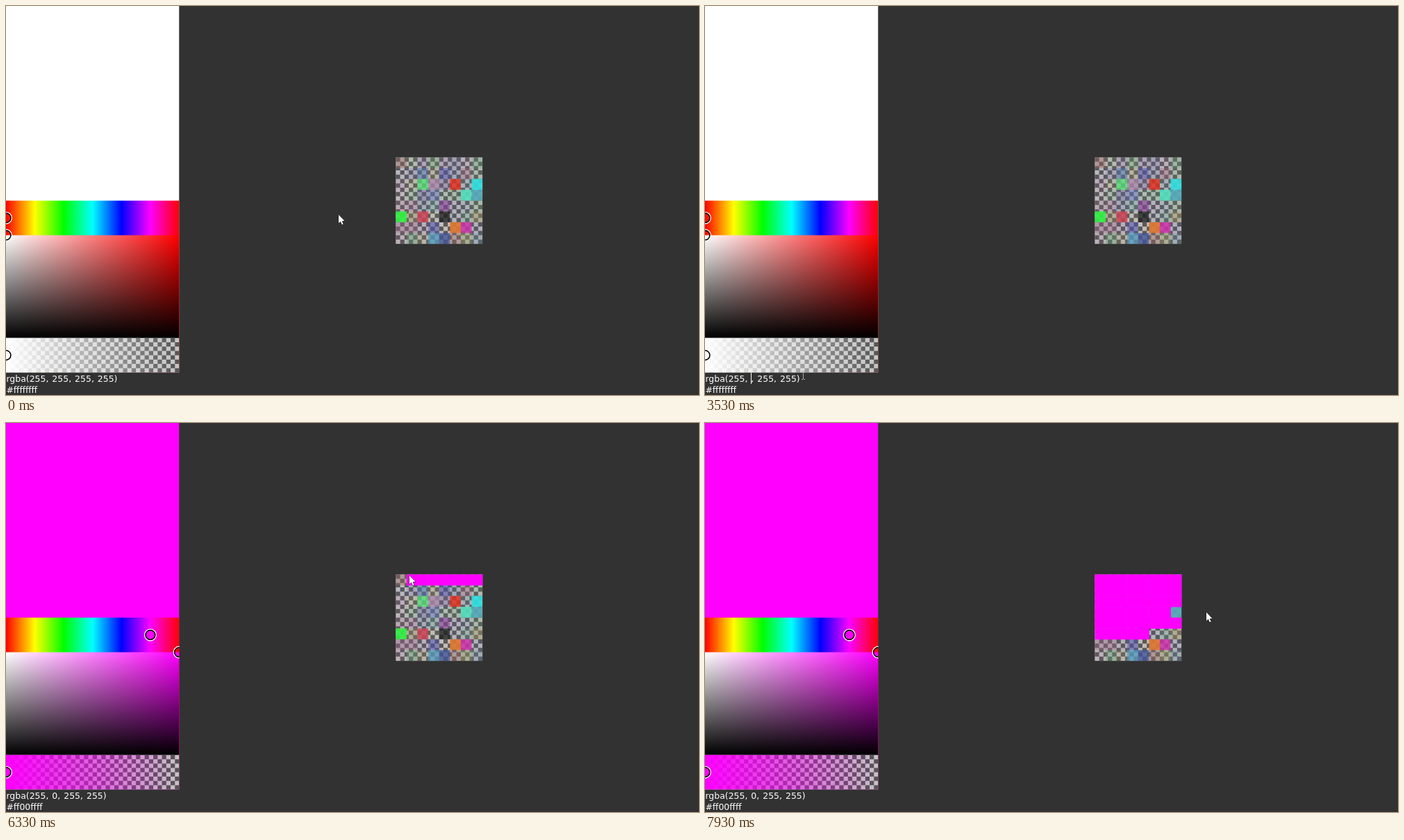
An HTML page with a canvas for the animation above (8000 ms loop, 998 by 561 pixels).

```html
<!DOCTYPE html>
<html>
<head>
<meta charset="utf-8">
<style>
  html, body { margin: 0; height: 100%; overflow: hidden; background: #323232; }
  canvas { display: block; }
</style>
</head>
<body>
<canvas id="stage" width="998" height="561"></canvas>
<script>
const ctx = document.getElementById('stage').getContext('2d');
const LOOP = 8000, STEP = 200 / 3;

// Layout of a 1280 pixel wide window, scaled to the stage
const S = 998 / 1280;
const PANEL = 320 * S, HUE_Y = 360 * S, SV_Y = 424 * S, ALPHA_Y = 614 * S, TEXT_Y = 678 * S;
const CHECK = 8 * S, PIXEL = 20 * S, SPRITE_X = 720 * S, SPRITE_Y = 280 * S;

const ENTER = 4670;
const BRUSH_START = 6150, ROW_TIME = 295, LAST_ROW = 5.575;
const SKIPPED = '3,7';

// Strong sprite pixels by row and column; the rest are faint random tints
const accents = {
  '1,2': '#57a9', '1,4': '#55a9', '2,2': '#5d7c', '2,3': '#a8ac', '2,5': '#d32d', '2,7': '#3dde',
  '3,3': '#67b8', '3,6': '#5dbe', '3,7': '#5abe', '4,4': '#849a', '5,0': '#3e4e', '5,2': '#c45d',
  '5,4': '#222c', '6,3': '#55a9', '6,5': '#d73e', '6,6': '#c3ad', '7,3': '#59bc', '7,4': '#459c'
};

// Pointer path before painting: time, x, y
const path = [
  [0, 479, 301], [800, 140, 508], [1000, 187, 506], [1400, 118, 536], [2050, 160, 537],
  [2600, 93, 537], [2870, 141, 532], [5400, 141, 532], [5870, 651, 169], [BRUSH_START, 708, 220]
];

let seed = 7;
const random = () => (seed = seed * 16807 % 2147483647) / 2147483647;
const cells = Array.from({ length: 64 }, (_, i) => {
  const row = i >> 3, col = i & 7;
  const tint = `hsla(${random() * 360}, 20%, 50%, ${0.1 + 0.4 * random()})`;
  return { row, col, key: row + ',' + col, fill: accents[row + ',' + col] || tint };
});

const mix = (a, b, k) => a + (b - a) * k;

// Rows swept so far, as a fraction
const sweepAt = t => Math.min((t - BRUSH_START) / ROW_TIME, LAST_ROW);
const brushX = sweep => 618 + 90 * Math.cos(Math.PI * sweep);

function pointerAt(t) {
  const brushEnd = BRUSH_START + LAST_ROW * ROW_TIME;
  if (t >= BRUSH_START) {
    const sweep = sweepAt(t), leave = Math.max(0, Math.min(1, (t - brushEnd) / 130));
    const y = SPRITE_Y + 2 + PIXEL * Math.floor(sweep);
    return [mix(brushX(sweep), 722, leave), mix(y, 273, leave)];
  }
  const i = path.findIndex(p => p[0] > t);
  const [t0, x0, y0] = path[i - 1], [t1, x1, y1] = path[i];
  const u = (t - t0) / (t1 - t0), k = u * u * (3 - 2 * u);
  return [mix(x0, x1, k), mix(y0, y1, k)];
}

function rect(x, y, w, h, fill) {
  ctx.fillStyle = fill;
  ctx.fillRect(x, y, w, h);
}

function gradient(x0, y0, x1, y1, colors) {
  const g = ctx.createLinearGradient(x0, y0, x1, y1);
  colors.forEach((c, i) => g.addColorStop(i / (colors.length - 1), c));
  return g;
}

function checkerboard(x, y, cols, rows) {
  rect(x, y, cols * CHECK, rows * CHECK, '#c4c4c4');
  for (let r = 0; r < rows; r++)
    for (let c = r % 2; c < cols; c += 2)
      rect(x + c * CHECK, y + r * CHECK, CHECK, CHECK, '#545454');
}

function ring(x, y) {
  for (const [radius, color] of [[8.2, '#fff'], [6.9, '#000']]) {
    ctx.beginPath();
    ctx.arc(x, y, radius, 0, 7);
    ctx.lineWidth = 1.6;
    ctx.strokeStyle = color;
    ctx.stroke();
  }
}

function drawPicker(magenta) {
  const color = magenta ? '#f0f' : '#fff';
  const band = (y, fill) => rect(0, y, PANEL, TEXT_Y - y, fill);
  const across = (...colors) => gradient(0, 0, PANEL, 0, colors);
  ctx.save();
  ctx.beginPath();
  ctx.rect(0, 0, PANEL, TEXT_Y);
  ctx.clip();
  band(0, color);
  band(HUE_Y, across('#f00', '#ff0', '#0f0', '#0ff', '#00f', '#f0f', '#f00'));
  band(SV_Y, across('#fff', magenta ? '#f0f' : '#f00'));
  band(SV_Y, gradient(0, SV_Y, 0, ALPHA_Y, ['#0000', '#000']));
  checkerboard(0, ALPHA_Y, 40, 8);
  band(ALPHA_Y, across(color, color + '0'));
  ring(magenta ? PANEL * 5 / 6 : 0, (HUE_Y + SV_Y) / 2);
  ring(magenta ? PANEL : 0, SV_Y);
  ring(0, (ALPHA_Y + TEXT_Y) / 2);
  ctx.restore();
}

function drawText(t, magenta) {
  const erased = Math.max(0, Math.floor((t - 3270) / 130) + 1);
  const green = t < 4130 ? '255'.slice(0, Math.max(0, 3 - erased)) : '0';
  const before = 'rgba(255, ' + green;
  ctx.font = `${16 * S}px "DejaVu Sans", sans-serif`;
  ctx.wordSpacing = '1px';
  ctx.fillStyle = '#fff';
  ctx.fillText(before + ', 255, 255)', 0.4, 542);
  ctx.fillText(magenta ? '#ff00ffff' : '#ffffffff', 0.4, 558);
  if (t >= 2600 && !magenta)
    rect(Math.round(ctx.measureText(before).width + 0.4), 529, 1, 16, '#fff');
}

function drawSprite(t) {
  const sweep = sweepAt(t), x = brushX(sweep);
  const isPainted = ({ row, col, key }) => {
    if (key === SKIPPED || sweep < row) return false;
    const center = SPRITE_X + (col + 0.5) * PIXEL;
    return sweep >= row + 1 || (row % 2 ? center < x : center > x);
  };
  const fillCell = ({ row, col }, fill, size) =>
    rect(SPRITE_X + col * PIXEL, SPRITE_Y + row * PIXEL, size, size, fill);

  checkerboard(SPRITE_X, SPRITE_Y, 20, 20);
  for (const cell of cells) fillCell(cell, cell.fill, PIXEL);
  // A slight overlap hides the seams between painted cells
  for (const cell of cells.filter(isPainted)) fillCell(cell, '#f0f', PIXEL + 0.4);
}

function drawPointer(x, y) {
  ctx.save();
  ctx.translate(Math.round(x), Math.round(y));
  if (x < PANEL && y > TEXT_Y) {
    rect(0, -5, 1, 11, '#aaa');
    for (const end of [-6, 6])
      for (const side of [-2, 1]) rect(side, end, 2, 1, '#aaa');
  } else {
    const arrow = new Path2D('M0 0V12.3L2.8 9.7L4.8 14.3L6.7 13.4L4.7 9.1H8.6Z');
    ctx.lineWidth = 1;
    ctx.strokeStyle = '#111';
    ctx.stroke(arrow);
    ctx.fillStyle = '#fff';
    ctx.fill(arrow);
  }
  ctx.restore();
}

function draw(now) {
  // The screen refreshes fifteen times a second
  const t = Math.floor((now % LOOP) / STEP + 0.1) * STEP + 4;
  const magenta = t >= ENTER;
  rect(0, 0, 998, 561, '#323232');
  drawPicker(magenta);
  drawText(t, magenta);
  drawSprite(t);
  drawPointer(...pointerAt(t));
  requestAnimationFrame(draw);
}
requestAnimationFrame(draw);
</script>
</body>
</html>
```
